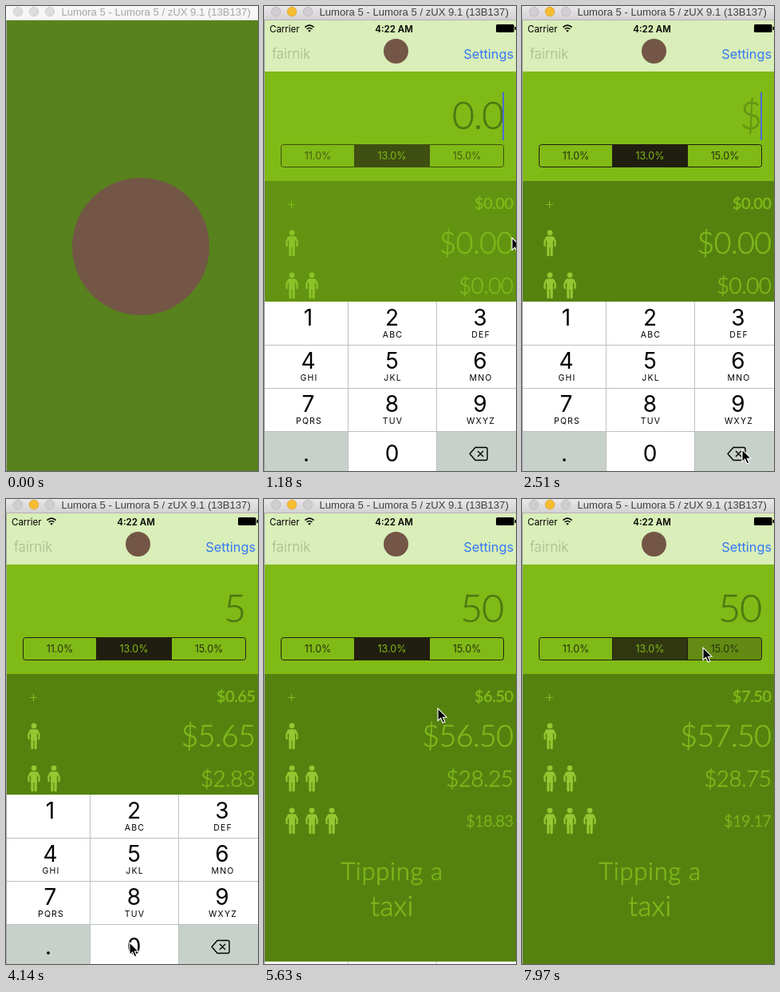
Recreate the animation shown at these times as an HTML page. Size 316 by 582 pixels, loop 8 s.

```html
<!DOCTYPE html>
<html lang="en">
<head>
<meta charset="utf-8">
<title>Tip calculator</title>
<style>
  html, body { margin: 0; width: 100%; height: 100%; overflow: hidden; background: #80ba16; }
  svg { display: block; width: 316px; height: 582px; }
  .ui { font-family: Inter, Roboto, sans-serif; }
  .thin { font-family: Lato, "Open Sans", sans-serif; font-weight: 300; stroke-width: .5; }
  .lime { fill: #80ba1c; stroke: #80ba1c; }
  .mid { text-anchor: middle; }
  .end { text-anchor: end; }
  .digit { font-size: 28px; }
  .letters { font-size: 10.5px; letter-spacing: 1.2px; }
</style>
</head>
<body>
<svg viewBox="0 0 316 582" xmlns="http://www.w3.org/2000/svg">
  <defs>
    <linearGradient id="chrome" x2="0" y2="1">
      <stop offset="0" stop-color="#e9e7e9"/>
      <stop offset="1" stop-color="#d3d1d3"/>
    </linearGradient>
    <g id="person" fill="#94c832" stroke="#94c832" stroke-linecap="round">
      <circle cy="-13.2" r="3.4" stroke="none"/>
      <path d="M-3 -8.8H3Q5 -8.8 5.4 -6.5L3.8 -2V5H-3.8V-2L-5.4 -6.5Q-5 -8.8 -3 -8.8Z" stroke="none"/>
      <path d="M-4.4 -7L-6.7 -2L-6.4 3M4.4 -7L6.7 -2L6.4 3" fill="none" stroke-width="2.3" stroke-linejoin="round"/>
      <path d="M-2.2 3L-2.1 14.8M2.2 3L2.1 14.8" stroke-width="3.1"/>
    </g>
  </defs>

  <rect width="316" height="582" fill="#80ba16"/>

  <g id="details">
    <rect x="1" y="219" width="315" height="363" fill="#55820f"/>
    <g id="people"></g>
    <path d="M30 248.5H39M34.5 244V253" stroke="#83bd22" stroke-width="1.1"/>
    <g class="thin end lime" id="amounts"></g>
    <g class="thin mid lime">
      <text x="160.5" y="477" font-size="31" letter-spacing=".7">Tipping a</text>
      <text x="160.5" y="522" font-size="35" letter-spacing=".3">taxi</text>
    </g>
    <rect id="sel1" x="114" y="174" width="94" height="28" fill="#201e10"/>
    <rect id="sel2" x="208" y="174" width="92" height="28" fill="#201e10"/>
    <rect x="21.5" y="173.5" width="279" height="28" rx="3" fill="none" stroke="#201e10"/>
    <path d="M113.5 174V201M207.5 174V201" stroke="#201e10"/>
    <g class="ui mid" font-size="12.5" fill="#26300f">
      <text x="67.5" y="192">11.0%</text>
      <text x="160.5" y="192" fill="#80ba16">13.0%</text>
      <text x="254.5" y="192">15.0%</text>
    </g>
  </g>

  <g id="field">
    <text id="bill" class="thin end" x="300" y="153.5" font-size="48" letter-spacing="-1"></text>
    <rect id="caret" x="299" y="108" width="2" height="60" fill="#4a6bd6"/>
  </g>

  <g id="keyboard" class="ui mid"></g>

  <g id="splash">
    <rect y="18" width="316" height="564" fill="#58821d"/>
    <circle cx="169" cy="301" r="86" fill="#735646"/>
  </g>

  <g id="nav" class="ui">
    <rect y="18" width="316" height="64" fill="#d9eeb8"/>
    <text x="7" y="32.5" font-size="11.5">Carrier</text>
    <text class="mid" x="163" y="32.5" font-size="11.5" font-weight="600">4:22 AM</text>
    <path d="M51.4 26.6Q57 21.6 62.6 26.6M53.6 29Q57 26 60.4 29" fill="none" stroke="#000" stroke-width="1.6"/>
    <path d="M55.2 30.8Q57 29.2 58.8 30.8L57 32.8Z"/>
    <rect x="291" y="23" width="22.5" height="10" rx="1.5"/>
    <rect x="314.5" y="26" width="1.5" height="4"/>
    <text x="10" y="66" font-size="17" font-weight="300" fill="#a5b98f">fairnik</text>
    <text class="end" x="313" y="66" font-size="16.3" fill="#3478f6">Settings</text>
    <circle cx="165.5" cy="56.5" r="15.5" fill="#735646"/>
  </g>

  <rect y="18" width="1" height="564" fill="#a3a3a8"/>
  <rect id="bar" width="316" height="17"/>
  <rect id="rule" y="17" width="316" height="1"/>
  <g id="lights" stroke-width=".8"></g>
  <text id="title" x="69.5" y="12" font-size="13.1" font-family="'Liberation Sans', Arial, sans-serif">Lumora 5 - Lumora 5 / zUX 9.1 (13B137)</text>

  <path id="pointer" d="M0 0V15.5L3.6 12.2L6.2 18L8.8 16.9L6.3 11.2H11Z" fill="#000" stroke="#fff" stroke-width="1.1"/>
</svg>
<script>
const LOOP = 8000, STEP = 147.8;
const $ = id => document.getElementById(id);

function add(parent, tag, attrs, text = '') {
  const el = document.createElementNS('http://www.w3.org/2000/svg', tag);
  for (const name in attrs) el.setAttribute(name, attrs[name]);
  el.textContent = text;
  parent.appendChild(el);
  return el;
}
const set = (id, name, value) => $(id).setAttribute(name, value);
const clamp = v => Math.max(0, Math.min(1, v));
const easeOut = v => 1 - Math.pow(1 - clamp(v), 3);

// Rows of people
for (let row = 0; row < 3; row++)
  for (let col = 0; col <= row; col++)
    add($('people'), 'use', { href: '#person', x: 35 + 25 * col, y: 297 + 53 * row });

// Tip, total, half, third: baseline, size, weight
const amounts = [[254, 19.5, 400], [309.5, 37.5, 300], [359.5, 27.7, 300], [410, 19.5, 300]].map(
  ([y, size, weight]) => add($('amounts'), 'text',
    { x: 312.5, y, 'font-size': size, 'letter-spacing': '-.015em', style: `font-weight:${weight}` }));

const lights = [15, 35, 55].map(cx => add($('lights'), 'circle', { cx, cy: 7, r: 5.8 }));

// Number pad
const KEY_GREY = '#c7d1ca', WHITE = '#fff';
const pad = $('keyboard');
const edges = [1, 105.5, 216.5, 322], centers = [55.5, 160.5, 271];
const labels = ['1', '2ABC', '3DEF', '4GHI', '5JKL', '6MNO', '7PQRS', '8TUV', '9WXYZ', '.', '0', ''];
const keys = labels.map((label, i) => {
  const col = i % 3, row = Math.floor(i / 3), y = 370 + 54 * row;
  const key = add(pad, 'rect', {
    x: edges[col], y, width: edges[col + 1] - edges[col], height: 54,
    fill: row === 3 && col !== 1 ? KEY_GREY : WHITE
  });
  const x = row === 3 && col === 0 ? 53 : centers[col];
  add(pad, 'text', { class: 'digit', x, y: y + (row === 3 ? 38 : 30) }, label.slice(0, 1));
  add(pad, 'text', { class: 'letters', x: x + 1, y: y + 45 }, label.slice(1));
  return key;
});
add(pad, 'path', {
  d: 'M1 424.5H316M1 478.5H316M1 532.5H316M105.5 370V586M216.5 370V586',
  stroke: '#bcc1c0', fill: 'none'
});
add(pad, 'path', {
  d: 'M265 552.5H278Q280 552.5 280 554.5V566.5Q280 568.5 278 568.5H265L258 560.5ZM268 557L275 564M275 557L268 564',
  stroke: '#000', 'stroke-width': 1.4, 'stroke-linejoin': 'round', fill: 'none'
});

// Pointer stops: tick, x, y
const path = [
  [3, 335, 60], [4, 322, 120], [5, 307, 180], [8, 311, 290], [12, 276, 555], [18, 276, 555],
  [22, 152, 445], [25, 152, 445], [28, 155, 555], [31, 155, 555], [34, 218, 262], [38, 218, 262],
  [41, 180, 470], [43, 132, 497], [44, 145, 490], [46, 223, 326], [48, 274, 190],
  [50, 250, 166], [51, 227, 186], [55, 227, 186]
];
function pointerAt(k) {
  let i = 1;
  while (i < path.length - 1 && path[i][0] < k) i++;
  const [k0, x0, y0] = path[i - 1], [k1, x1, y1] = path[i];
  const u = clamp((k - k0) / (k1 - k0));
  return [x0 + (x1 - x0) * u, y0 + (y1 - y0) * u];
}

// Value of the last [tick, value] pair reached
const latest = (list, k) => list.filter(([at]) => at <= k).pop()[1];
const entries = [[0, '0.0'], [13, '0.'], [15, '0'], [17, ''], [24, '5'], [30, '50']];
const blink = [[0, 1], [20, .3], [21, 0], [23, 1], [27, .3], [28, 0], [30, 1],
  [32, .3], [33, 0], [34, 1], [36, .3], [37, 0]];
const between = (k, a, b) => k >= a && k <= b;

function draw(t) {
  const k = Math.floor((t + 12) / STEP);
  const active = k >= 3;

  set('bar', 'fill', active ? 'url(#chrome)' : '#f6f6f6');
  set('rule', 'fill', active ? '#b5b3b5' : '#d9d9d9');
  set('title', 'fill', active ? '#404040' : '#a6a6a6');
  lights.forEach((light, i) => {
    const on = active && i === 1;
    light.setAttribute('fill', on ? '#f6bd30' : active ? '#d0ced0' : '#dcdcdc');
    light.setAttribute('stroke', on ? '#dda32a' : active ? '#bab8ba' : '#cecece');
  });

  const cover = clamp(1 - (k - 2) * .26);
  set('splash', 'opacity', cover);
  set('nav', 'opacity', 1 - Math.pow(cover, 1.35));
  set('details', 'opacity', clamp((k * 148 - 706) / 705));

  const rise = easeOut((k - 4.96) / 3), fall = easeOut((k - 36.3) / 2.5);
  set('keyboard', 'transform', `translate(0 ${216 * (1 - rise + fall)})`);
  set('field', 'transform', `translate(0 ${130 * (1 - rise)})`);

  const entry = latest(entries, k);
  const ink = entry ? '#4b7814' : '#659414';
  $('bill').textContent = entry || '$';
  set('bill', 'fill', ink);
  set('bill', 'stroke', ink);
  set('caret', 'opacity', latest(blink, k));

  const bill = Number(entry), tip = bill * (k >= 53 ? .15 : .13), total = bill + tip;
  [tip, total, total / 2, total / 3].forEach((v, i) => {
    amounts[i].textContent = '$' + v.toFixed(2);
  });

  const erasing = k === 12 || between(k, 14, 16);
  keys[11].setAttribute('fill', erasing ? WHITE : KEY_GREY);
  keys[10].setAttribute('fill', between(k, 29, 30) ? KEY_GREY : WHITE);

  set('sel1', 'opacity', k >= 54 ? .83 : 1);
  set('sel2', 'opacity', k >= 52 ? .3 : 0);

  set('pointer', 'transform', `translate(${pointerAt(k)})`);
  set('pointer', 'visibility', active ? 'visible' : 'hidden');
}

const start = performance.now();
function tick() {
  draw((performance.now() - start) % LOOP);
  requestAnimationFrame(tick);
}
tick();
</script>
</body>
</html>
```
